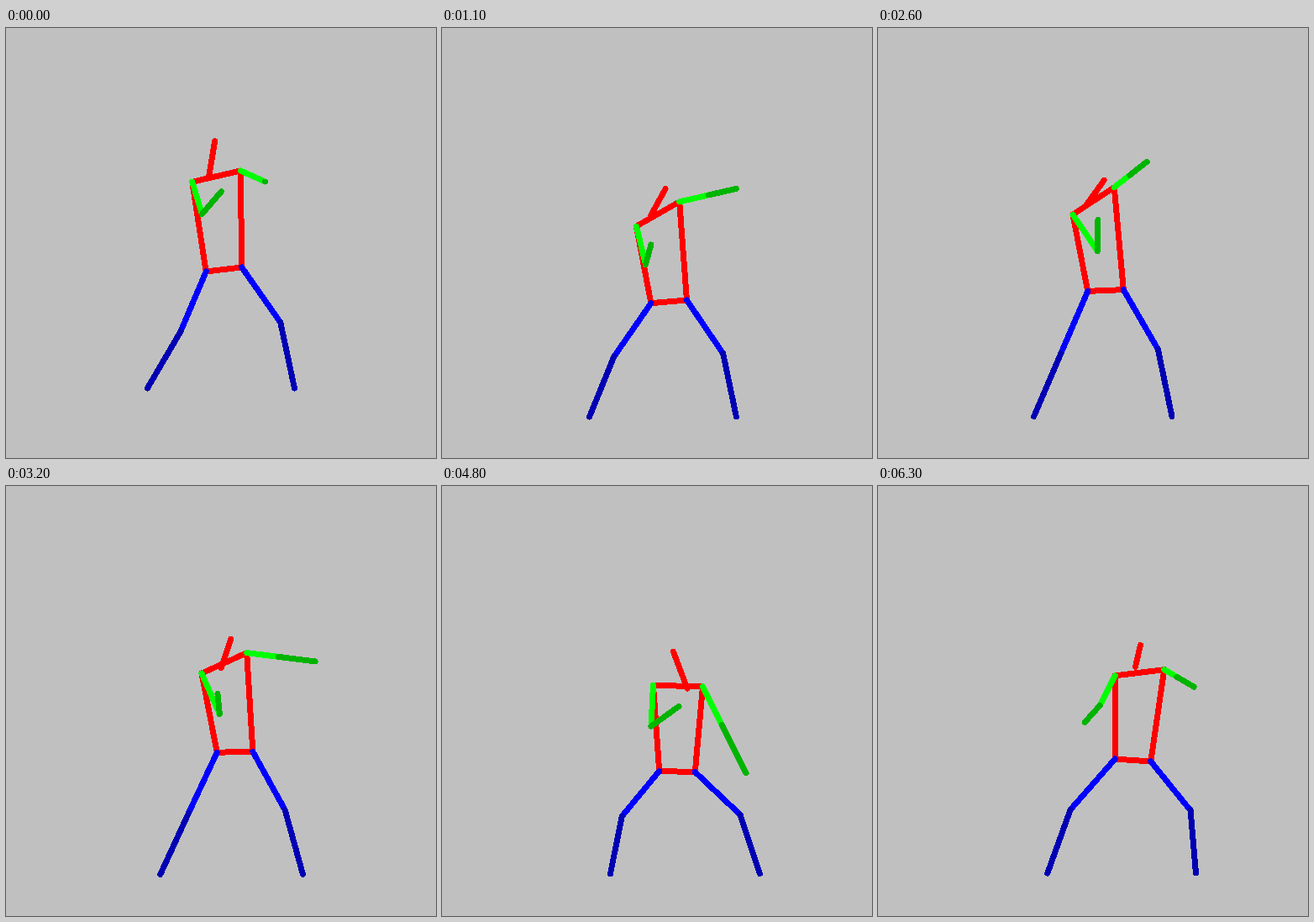
An HTML page that plays this animation: 512 by 512 pixels, repeating every 6400 ms.

```html
<!DOCTYPE html>
<html>
<head>
<meta charset="utf-8">
<title>Stick figure dance</title>
<style>
html, body { margin: 0; width: 100%; height: 100%; overflow: hidden; background: #c0c0c0; }
svg { display: block; fill: none; stroke-width: 7; stroke-linecap: round; stroke-linejoin: round; shape-rendering: crispEdges; }
</style>
</head>
<body>
<svg id="stage" width="512" height="512" viewBox="0 0 512 512"></svg>
<script>
const STEP = 100, STEPS = 64, END = STEPS - 1;
const { sin, cos, PI, hypot, floor } = Math;
const stage = document.getElementById('stage');

// Smooth curve through [time, value] knots that never overshoots them.
function curve(...knots) {
  const last = knots.length - 1;
  const slope = i => (knots[i + 1][1] - knots[i][1]) / (knots[i + 1][0] - knots[i][0]);
  const tangents = knots.map((k, i) => {
    if (i === 0) return slope(0);
    if (i === last) return slope(last - 1);
    const a = slope(i - 1), b = slope(i);
    return a * b > 0 ? 2 * a * b / (a + b) : 0;
  });
  return t => {
    let i = 0;
    while (i < last - 1 && t >= knots[i + 1][0]) i++;
    const [t0, v0] = knots[i], [t1, v1] = knots[i + 1];
    const h = t1 - t0, u = (t - t0) / h, w = 1 - u;
    return v0 * (1 + 2 * u) * w * w + v1 * u * u * (3 - 2 * u)
      + h * u * w * (tangents[i] * w - tangents[i + 1] * u);
  };
}

// The same for [time, x, y] points.
function path(...points) {
  const x = curve(...points.map(p => [p[0], p[1]]));
  const y = curve(...points.map(p => [p[0], p[2]]));
  return t => [x(t), y(t)];
}

const add = (a, b, k = 1) => [a[0] + b[0] * k, a[1] + b[1] * k];

// Body: hips lead, shoulders follow with a lean and a slow turn.
const hips = path([0, 259.5, 287.5], [6, 268.5, 325.5], [17, 271, 326], [26, 271, 312.5], [38, 275, 321],
  [42, 276, 312], [48, 280, 340], [51, 284, 356], [56, 291, 350], [63, 303.5, 326.5]);
const lean = curve([0, -9], [20, -15], [38, -10.5], [48, 1], [63, 8]);
const swing = t => cos(2 * PI * (t - 21) / 60);
const turn = t => (23 - 0.17 * t + 17 * swing(t)) * PI / 180;
const head = t => [4 + 10 * swing(t), -36 + 0.1 * t + 10 * swing(t)];
const neck = path([0, -9, 1], [26, -8, 4], [38, 3, 7], [48, 11, 3], [63, -5, -7]);

// Arms, relative to their shoulders.
const upperAngle = curve([0, 17], [6, 10], [26, 34], [38, 9], [48, -3], [63, -27]);
const leftElbow = t => {
  const a = upperAngle(t) * PI / 180, length = 40 + 13 * sin(PI * t / END);
  return [length * sin(a), length * cos(a)];
};
const leftHand = path([0, 34.5, 11.5], [6, 8, 38.5], [17, 30, 0], [26, 30, 6.5],
  [38, 8, 39], [48, 30.5, 25], [63, -36, 55.5]);
const rightHand = path([0, 29.5, 13], [6, 65, 33], [14, 68, -38], [17, 66, -19.5], [26, 39, -30.5],
  [33, 84, 20], [38, 14.5, 88], [48, 51.5, 103], [63, 35.5, 20.5]);
const elbowShare = curve([0, 1], [6, 0.53], [63, 0.42]);

// Legs: the left foot slides out on every beat, knees bow outwards.
const beat = t => sin(PI * (t - 6) / 10.5) ** 2;
const leftFootX = curve([0, 175], [6, 182.5], [17, 182.5], [38, 195], [63, 208.5]);
const rightFootX = curve([0, 343.5], [6, 350.5], [26, 350], [38, 360.5], [48, 378.5], [63, 378.5]);
const footY = curve([0, 429], [6, 463], [63, 461]);
const leftBow = curve([0, -5], [6, 10], [26, 0], [38, 1], [48, 17], [63, 15]);
const rightBow = curve([0, 16], [26, 13], [38, 6], [48, 18], [63, 22]);

function knee(hip, foot, bow) {
  const dx = foot[0] - hip[0], dy = foot[1] - hip[1], k = bow / hypot(dx, dy);
  return [(hip[0] + foot[0]) / 2 + dy * k, (hip[1] + foot[1]) / 2 - dx * k];
}

function pose(t) {
  const hip = hips(t), a = turn(t);
  const chest = add(hip, [lean(t), -105 + 0.17 * (hip[1] - 322)]);
  const across = [29.5 * cos(a), -29.5 * sin(a)], tilt = [21.3, -2.5 + 0.063 * t];
  const ls = add(chest, across, -1), rs = add(chest, across);
  const lh = add(hip, tilt, -1), rh = add(hip, tilt);
  const le = add(ls, leftElbow(t)), re = add(rs, rightHand(t), elbowShare(t));
  const lf = [leftFootX(t) - 7 * beat(t), footY(t)], rf = [rightFootX(t), footY(t)];
  const lk = knee(lh, lf, -leftBow(t)), rk = knee(rh, rf, rightBow(t));
  return [
    ['#f00', ls, rs, rh, lh, ls],
    ['#f00', add(chest, neck(t)), add(chest, head(t))],
    ['#0f0', ls, le],
    ['#00b400', le, add(ls, leftHand(t))],
    ['#0f0', rs, re],
    ['#00b400', re, add(rs, rightHand(t))],
    ['#00f', lh, lk],
    ['#0000b4', lk, lf],
    ['#00f', rh, rk],
    ['#0000b4', rk, rf]
  ];
}

const lines = pose(0).map(([color]) => {
  const line = document.createElementNS(stage.namespaceURI, 'polyline');
  line.setAttribute('stroke', color);
  return stage.appendChild(line);
});

function tick() {
  const t = floor(performance.now() / STEP) % STEPS;
  pose(t).forEach(([, ...points], i) => lines[i].setAttribute('points', points.join(' ')));
  requestAnimationFrame(tick);
}
tick();
</script>
</body>
</html>
```
